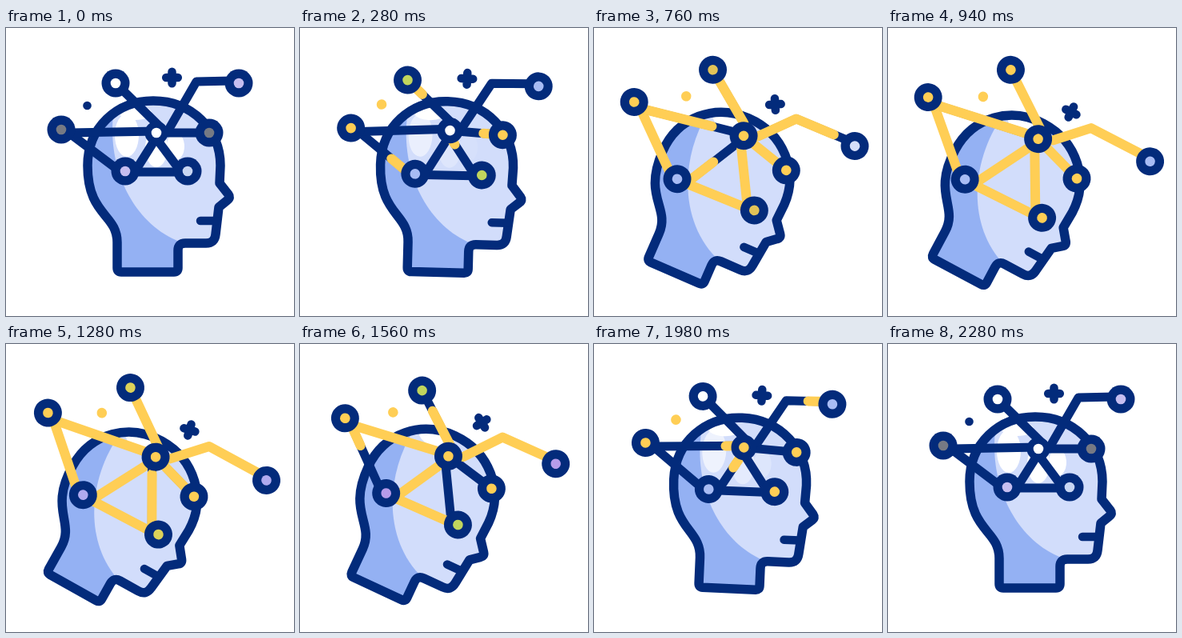
These frames come from a looping animation (360 px wide and 360 px high, 2400 ms). An HTML page with a canvas:

```html
<!DOCTYPE html>
<html lang="en">
<head>
<meta charset="utf-8">
<title>Thinking head</title>
<style>
  html, body { margin: 0; width: 100%; height: 100%; overflow: hidden; background: #fff; }
  canvas { display: block; width: 360px; height: 360px; }
</style>
</head>
<body>
<canvas id="stage" width="360" height="360"></canvas>
<script>
const ctx = document.getElementById('stage').getContext('2d');
const LOOP = 2400, END = 2280, NAVY = '#032b7b', YELLOW = '#ffce55';

// Resting place and outward drift, in the frame that turns with the head
const POINTS = {
  A: [291, 69, 33, 1], B: [137, 69, -21, -18], C: [69, 127, -28, 3], D: [188, 131, -1, -20],
  E: [254, 131, -1, 1], F: [149, 179, -19, 20], G: [227, 179, 11, 17], elbow: [238, 67, 1, 1],
};

// Stops as [point, dx, dy], then when the glow starts and ends filling and draining
const LINKS = [
  { stops: [['F', -12, -4], ['C', 11, 5]], glow: [140, 600, 1300, 1690] },
  { stops: [['B', 0, 0], ['D', 7, -5]], glow: [0, 920, 1380, 1950] },
  { stops: [['C', 12, 4], ['D', 0, -2]], glow: [350, 950, 1600, 2080] },
  { stops: [['E', 0, 0], ['D', 0, 0]], glow: [120, 560, 1200, 1540] },
  { stops: [['F', 13, -1], ['D', -2, 9]], glow: [600, 920, 1620, 2200] },
  { stops: [['D', -4, 2], ['G', -11, -3]], glow: [140, 600, 1200, 1540] },
  { stops: [['F', 0, 1], ['G', 0, 1]], glow: [300, 590, 1580, 1950] },
  { stops: [['D', 17, -7], ['elbow', 0, 0], ['A', -8, -3]], glow: [290, 860, 1580, 2080] },
];

const PALETTE = {
  w: [255, 255, 255], y: [255, 206, 85], b: [168, 188, 244], l: [198, 190, 240], p: [183, 156, 234],
  g: [193, 213, 93], o: [200, 185, 90], k: [118, 122, 132], c: [200, 214, 243],
};
const COLOR_TIMES = [0, 280, 600, 940, 1560, 1980, 2280];
const CORES = {
  A: 'lbwbpbl', B: 'wgoygww', C: 'kyyyyyk', D: 'wwyyyyw', E: 'kyyyyyk', F: 'lbbbpbl', G: 'cgoygyc',
};

const HEAD = new Path2D(`M139 300V268C139 232 102 235 102 172C102 125 138 91 184 91
  C232 91 268 127 268 172L267 194L278 208Q281 212 277 215L266 224L262 258Q261 269 250 269
  H224Q215 269 215 278V300Q215 305 210 305H144Q139 305 139 300Z`);
const FACE = new Path2D('M138 85C119 165 156 247 222 269H300V85Z');
const MOUTH = new Path2D('M243 241H262');

const ramp = (t, from, to) => Math.min(1, Math.max(0, (t - from) / (to - from)));
const cubic = u => u < .5 ? 4 * u ** 3 : 1 - 4 * (1 - u) ** 3;
const sine = u => (1 - Math.cos(Math.PI * u)) / 2;

function disc(x, y, r, fill) {
  ctx.fillStyle = fill;
  ctx.beginPath();
  ctx.arc(x, y, r, 0, 2 * Math.PI);
  ctx.fill();
}

function glare(x, y, rx, ry, alpha) {
  ctx.fillStyle = `rgba(255,255,255,${Math.max(0, alpha)})`;
  ctx.beginPath();
  ctx.ellipse(x, y, rx, ry, 0, 0, 2 * Math.PI);
  ctx.fill();
}

function coreColor(keys, t) {
  let i = 0;
  while (i < COLOR_TIMES.length - 2 && t >= COLOR_TIMES[i + 1]) i++;
  const u = ramp(t, COLOR_TIMES[i], COLOR_TIMES[i + 1]);
  const from = PALETTE[keys[i]], to = PALETTE[keys[i + 1]];
  return `rgb(${from.map((v, n) => Math.round(v + (to[n] - v) * u))})`;
}

function drawHead(spread) {
  ctx.save();
  ctx.clip(HEAD);
  ctx.fillStyle = '#94b1f3';
  ctx.fill(HEAD);
  ctx.fillStyle = '#d2ddfb';
  ctx.fill(FACE);
  ctx.clip(FACE);
  glare(162, 106, 20, 9, 1);
  glare(151, 134, 15, 27, 1 - 2.5 * spread);
  glare(212, 148, 11, 17, 1 - 5 * spread);
  glare(188, 150, 14, 24, 1 - 4 * spread);
  ctx.restore();
  ctx.strokeStyle = NAVY;
  ctx.lineWidth = 11.5;
  ctx.stroke(HEAD);
  ctx.lineWidth = 10.5;
  ctx.stroke(MOUTH);
}

function drawLink({ stops, glow }, place, t) {
  const pts = stops.map(([name, dx, dy]) => [place[name][0] + dx, place[name][1] + dy]);
  const path = new Path2D();
  let length = 0;
  pts.forEach(([x, y], i) => {
    path.lineTo(x, y);
    if (i) length += Math.hypot(x - pts[i - 1][0], y - pts[i - 1][1]);
  });
  const head = ramp(t, glow[0], glow[1]), tail = ramp(t, glow[2], glow[3]);
  if (head < 1 || tail > 0) {
    ctx.lineWidth = 11;
    ctx.strokeStyle = NAVY;
    ctx.stroke(path);
  }
  if (head <= tail) return;
  ctx.lineWidth = 12;
  ctx.strokeStyle = YELLOW;
  ctx.setLineDash([(head - tail) * length, 2 * length]);
  ctx.lineDashOffset = -tail * length;
  ctx.stroke(path);
  ctx.setLineDash([]);
}

function drawPlus(angle) {
  ctx.save();
  ctx.translate(207.5, 62);
  ctx.rotate(angle);
  ctx.strokeStyle = NAVY;
  ctx.lineWidth = 10.5;
  ctx.stroke(new Path2D('M-7.3 0H7.3M0 -7.3V7.3'));
  ctx.restore();
}

function draw(t) {
  const turn = t < 1200 ? cubic(t / 1200) : 1 - cubic(ramp(t, 1200, END));
  const spread = t < 1050 ? sine(ramp(t, 0, 1000)) : 1 - sine(ramp(t, 1100, END));
  const place = {};
  for (const name in POINTS) {
    const [x, y, dx, dy] = POINTS[name];
    place[name] = [x + dx * spread, y + dy * spread];
  }

  ctx.fillStyle = '#fff';
  ctx.fillRect(0, 0, 360, 360);
  ctx.lineCap = ctx.lineJoin = 'round';
  ctx.save();
  ctx.translate(180 - 32.3 * turn, 180 + turn * (11 + 6 * turn));
  ctx.rotate(29.3 * turn * Math.PI / 180);
  ctx.translate(-180, -180);

  drawHead(spread);
  const lit = t > 120 && t < 2160;
  disc(101.5, 97, lit ? 6.3 : 5.3, lit ? YELLOW : NAVY);
  drawPlus(spread ** 2.5 * Math.PI / 2);
  LINKS.forEach(link => drawLink(link, place, t));
  for (const name in CORES) {
    const [x, y] = place[name];
    disc(x, y, name === 'D' ? Math.min(17.5, 14.5 + 9 * spread) : 17.5, NAVY);
    disc(x, y, 6.3, coreColor(CORES[name], t));
  }
  ctx.restore();
}

function tick() {
  draw(Math.min(performance.now() % LOOP, END));
  requestAnimationFrame(tick);
}
tick();
</script>
</body>
</html>
```
